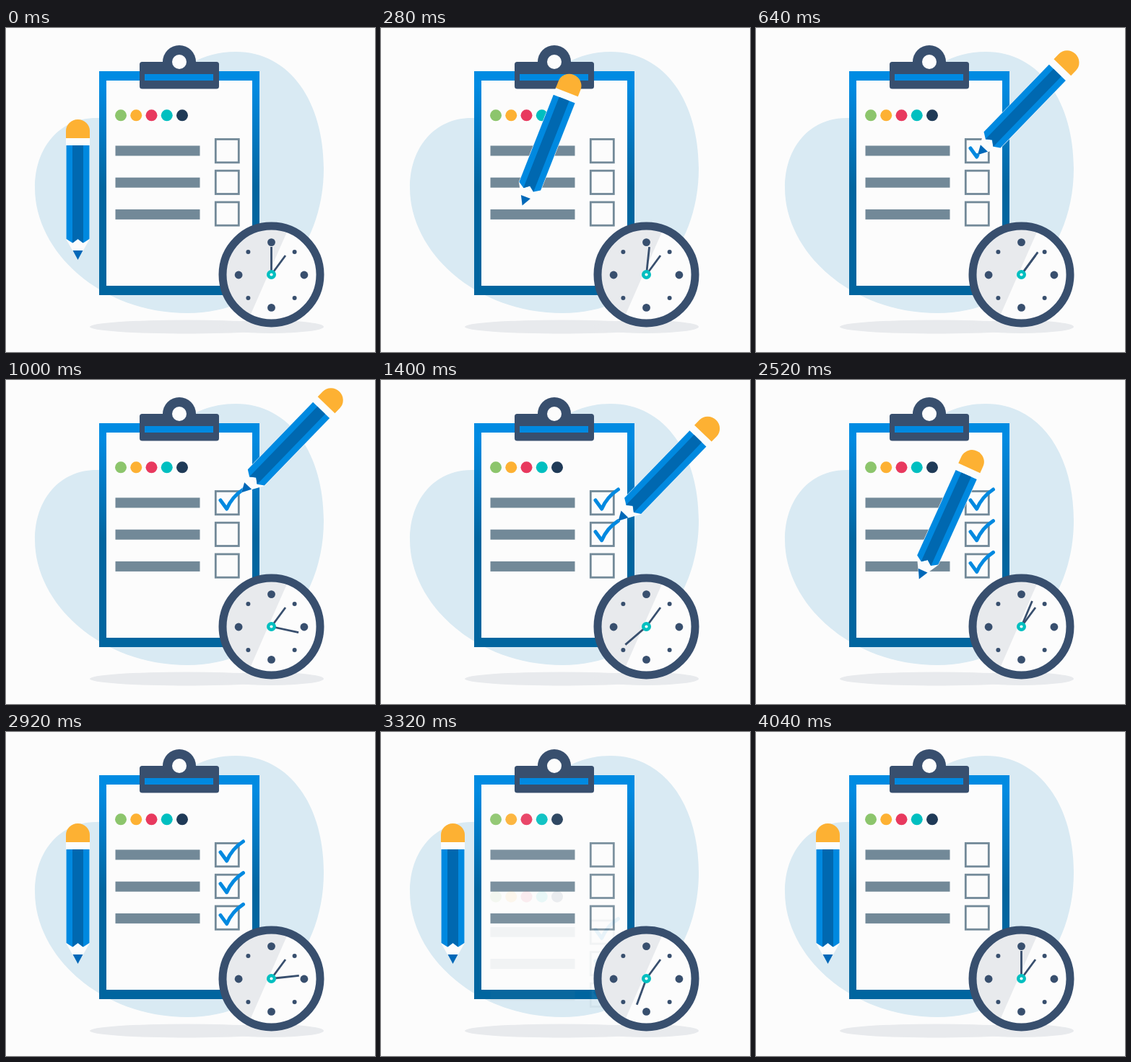
An HTML page for the animation above (5000 ms loop, 511 by 450 pixels).

```html
<!DOCTYPE html>
<html lang="en">
<head>
<meta charset="utf-8">
<title>Checklist</title>
<style>
  html, body { margin: 0; width: 100%; height: 100%; overflow: hidden; background: #fcfcfc; }
  svg { display: block; width: 511px; height: 450px; }
</style>
</head>
<body>
<svg viewBox="0 0 511 450">
  <defs>
    <linearGradient id="frame" gradientUnits="userSpaceOnUse" x1="0" y1="80" x2="0" y2="220">
      <stop stop-color="#008be2"/><stop offset="1" stop-color="#00659f"/>
    </linearGradient>
    <clipPath id="face"><circle cx="367.5" cy="342.5" r="63"/></clipPath>
  </defs>

  <path fill="#d9eaf3" d="M125 125C200 125 225 33 318 33C395 33 440 105 440 195C440 310 360 396 252 396C130 396 40 310 40 222C40 165 75 125 125 125Z"/>
  <g fill="#e8eaed">
    <ellipse cx="250" cy="415" rx="134" ry="9.5"/>
    <ellipse cx="367" cy="415" rx="73" ry="9"/>
  </g>

  <path fill="url(#frame)" d="M129 60H351V371H129Z"/>
  <path fill="#fcfcfc" d="M139 73H341V358H139Z"/>
  <g fill="#384f6e">
    <rect x="185" y="47" width="110" height="37.5" rx="3.5"/>
    <circle cx="240" cy="47" r="23"/>
  </g>
  <circle cx="240" cy="47" r="10" fill="#fcfcfc"/>
  <path fill="#0089e0" d="M192 64H287V73H192Z"/>

  <g id="fresh"></g>
  <g id="done"></g>

  <g id="pencil">
    <path fill="#fcfcfc" d="M-16.5 -170H16.5V-29L0 0L-16.5 -29Z"/>
    <path fill="#fdb133" d="M-16.5 -169V-179A16.5 16 0 0 1 16.5 -179V-169Z"/>
    <path fill="#0089e0" d="M-16 -159H16V-29L7.5 -23.5H-7.5L-16 -29Z"/>
    <path fill="#fcfcfc" d="M-7.5 -23L0 -29L7.5 -23Z"/>
    <path fill="#0068b0" d="M-7.5 -159H7.5V-23.5L0 -29L-7.5 -23.5Z"/>
    <path fill="#0068b8" d="M-7 -13H7L0 0Z"/>
  </g>

  <circle cx="367.5" cy="342.5" r="67.5" fill="#fcfcfc"/>
  <path fill="#e8eaed" clip-path="url(#face)" d="M394 272L333 411H290V272Z"/>
  <circle cx="367.5" cy="342.5" r="67.5" fill="none" stroke="#384f6e" stroke-width="11"/>
  <g id="marks" fill="#384f6e"></g>
  <g stroke="#384f6e" stroke-width="2.8">
    <path d="M367.5 342.5L387 316"/>
    <path id="minute" d="M367.5 342.5V304"/>
  </g>
  <circle cx="367.5" cy="342.5" r="4.3" fill="#fcfcfc" stroke="#00bfc0" stroke-width="4.4"/>
</svg>

<script>
const $ = id => document.getElementById(id);
const PITCH = 43.7;
const rows = [0, 1, 2];

// Static parts: sheet contents and clock marks
const dots = ['#8cc56c', '#fdb133', '#e8395e', '#00bfc0', '#1f3a57']
  .map((c, i) => `<circle cx="${159 + i * 21.25}" cy="121.3" r="8" fill="${c}"/>`).join('');
const lines = rows.map(i => `
  <rect x="151.5" y="${163.5 + i * 44.2}" width="117" height="14" fill="#728998"/>
  <rect x="290.3" y="${154.5 + i * PITCH}" width="32" height="32.3" fill="#fcfcfc" stroke="#728998" stroke-width="2.8"/>`).join('');
const ticks = rows.map(i => `
  <path class="tick" transform="translate(0 ${i * PITCH})" d="M297 167L305.7 179Q313 162 328.5 152"
    fill="none" stroke="#0089e0" stroke-width="5" stroke-linecap="round" stroke-linejoin="round"/>`).join('');
$('fresh').innerHTML = dots + lines;
$('done').innerHTML = dots + lines + ticks;
$('marks').innerHTML = [...Array(8).keys()].map(i => {
  const a = i * Math.PI / 4;
  return `<circle cx="${367.5 + 45.4 * Math.sin(a)}" cy="${343 - 45.4 * Math.cos(a)}" r="${i % 2 ? 3 : 5.4}"/>`;
}).join('');

const tickPaths = [...document.querySelectorAll('.tick')];
const tickLength = tickPaths[0].getTotalLength();

const span = (t, a, b) => Math.min(1, Math.max(0, (t - a) / (b - a)));
const smooth = p => p * p * (3 - 2 * p);
const mix = (a, b, p) => a.map((v, i) => v + (b[i] - v) * p);

// Cubic bezier easing (.65, 0, .7, 1), solved by bisection
function sweep(x) {
  let lo = 0, hi = 1;
  for (let i = 0; i < 24; i++) {
    const s = (lo + hi) / 2, r = 1 - s;
    if (1.95 * s * r * r + 2.1 * s * s * r + s ** 3 < x) lo = s; else hi = s;
  }
  return smooth(lo);
}

// Poses are [x, y, angle] of the pencil tip
const TILT = 44, DRAW = 200;
const rest = [99.5, 322, 0];
const starts = [570, 1200, 1885];   // each tick begins
const leaves = [0, 960, 1620, 2250]; // each flight begins
function onTick(i, p) {
  const q = tickPaths[i].getPointAtLength(p * tickLength);
  return [q.x, q.y + i * PITCH, TILT];
}
function pencilPose(t) {
  let pose = rest;
  starts.forEach((s, i) => {
    if (t >= leaves[i]) pose = mix(pose, onTick(i, 0), smooth(span(t, leaves[i], s)));
    if (t >= s) pose = onTick(i, span(t, s, s + DRAW));
  });
  return mix(pose, rest, smooth(span(t, leaves[3], 2830)));
}

function draw(t) {
  $('minute').setAttribute('transform', `rotate(${360 * sweep(t < 4000 ? t % 2000 / 2000 : 0)} 367.5 342.5)`);

  const [x, y, a] = pencilPose(t);
  $('pencil').setAttribute('transform', `translate(${x} ${y}) rotate(${a})`);

  tickPaths.forEach((path, i) => {
    const p = span(t, starts[i], starts[i] + DRAW);
    path.style.visibility = p ? 'inherit' : 'hidden';
    path.style.strokeDasharray = p < 1 ? `${p * tickLength} 99` : 'none';
  });

  // The finished list drops away while an empty one fades in
  const swap = span(t, 2940, 3350);
  $('fresh').setAttribute('opacity', swap);
  $('done').setAttribute('opacity', 1 - swap);
  $('done').setAttribute('transform', `translate(0 ${109 * smooth(swap)})`);
}

const begin = performance.now();
function tick() {
  const t = (performance.now() - begin) % 5000;
  draw(Math.floor(t / 40) * 40);
  requestAnimationFrame(tick);
}
tick();
</script>
</body>
</html>
```
